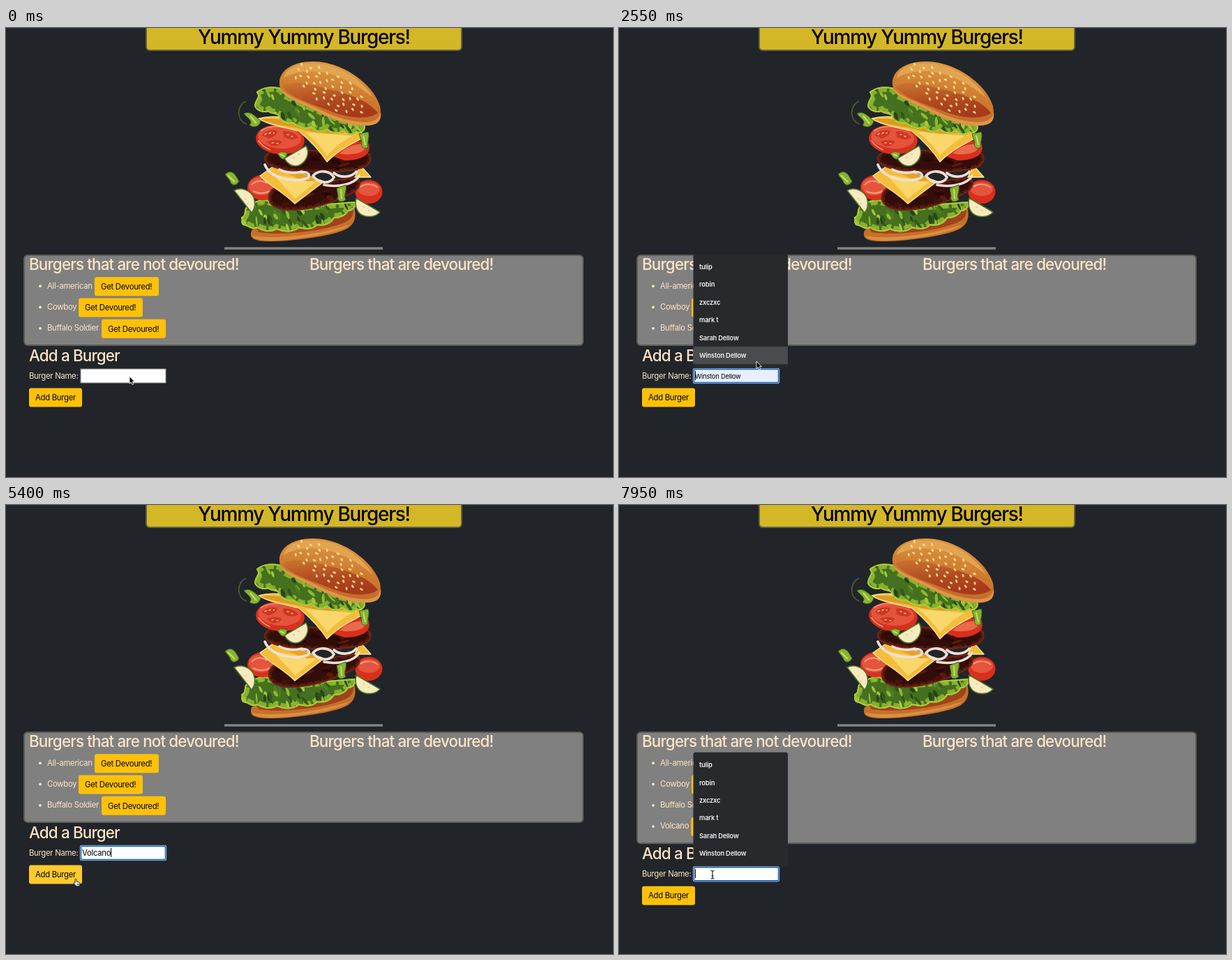
An HTML page for the animation above (8 s loop, 870x644 px).

```html
<!DOCTYPE html>
<html lang="en">
<head>
<meta charset="utf-8">
<title>Yummy Yummy Burgers!</title>
<style>
  html, body { margin: 0; width: 100%; height: 100%; overflow: hidden; background: #212529; }
  svg { display: block; width: 870px; height: 644px; }
  text { font: 11.3px Inter, "Open Sans", sans-serif; font-optical-sizing: none; letter-spacing: -.024em; fill: #000; }
  .title { font-size: 28px; font-weight: 500; letter-spacing: -.047em; }
  .head { font-size: 22.4px; font-weight: 500; letter-spacing: -.038em; fill: bisque; }
  .body { fill: bisque; }
  .menu { font-size: 9.3px; font-weight: 600; letter-spacing: -.02em; fill: #f1f1f1; }
  .ghost { font-size: 9.4px; }
  .btn { fill: #ffc107; }
  .btn.hover { fill: #ffca2c; }
  .btn.focus { fill: #ffca2c; stroke: #d9a406; stroke-opacity: .55; stroke-width: 5.6px; paint-order: stroke; }
  .leaf { fill: #44701f; stroke: #a9cb3b; stroke-width: 2; stroke-linejoin: round; }
  .leafs .rim { fill: none; stroke: #86b02d; stroke-width: 13; stroke-dasharray: 13 4; }
  .bit { fill: #87b32f; stroke: #3f661d; stroke-width: 1; }
  .slice { fill: #f6eabf; stroke: #4d7427; stroke-width: 1.6; stroke-linejoin: round; }
  .onion { fill: none; stroke: #f0dfd7; stroke-width: 3.6; stroke-linecap: round; }
  .patty { fill: #330d09; stroke: #6e2716; stroke-width: 2; }
  .meat .rim { fill: none; stroke: #541a10; stroke-width: 8; stroke-dasharray: 9 2; }
  .cheese { fill: #f4bd3a; stroke: #fbe9a2; stroke-width: 1.3; stroke-linejoin: round; }
  .tomato { fill: #da2f1d; }
</style>
</head>
<body>
<svg viewBox="0 0 870 644">
  <defs>
    <clipPath id="leafTop"><path d="M357 112C357 102 366 100 360 92C370 84 384 84 394 87L400 95C425 108 450 118 480 130L513 138C516 146 510 152 502 149C496 155 488 152 483 147C474 153 466 150 460 145C452 151 444 148 438 142C428 146 418 142 412 136C402 138 394 133 392 127C388 120 380 124 376 119C368 122 360 118 357 112Z"/></clipPath>
    <clipPath id="leafLow"><path d="M338 272C346 268 340 262 346 256C352 250 360 250 366 246L420 256L500 250C502 256 496 262 490 262C486 270 478 272 470 272C466 280 456 284 446 282C438 290 428 288 420 286C410 294 398 292 388 288C378 294 366 290 360 286C350 290 348 282 340 282C336 278 340 276 338 272Z"/></clipPath>
    <clipPath id="pattyTop"><path d="M371 186C374 174 400 172 440 176L515 178C526 182 524 194 514 199C490 208 440 208 405 204C385 201 370 196 371 186Z"/></clipPath>
    <clipPath id="pattyLow"><path d="M377 240C380 226 400 222 440 224L500 214C510 218 508 228 500 234C480 246 440 262 405 261C385 260 375 252 377 240Z"/></clipPath>
    <linearGradient id="bunTop" x1=".6" y1="0" x2=".35" y2="1">
      <stop offset="0" stop-color="#e09a45"/><stop offset=".45" stop-color="#cf7d30"/><stop offset="1" stop-color="#c06426"/>
    </linearGradient>
    <linearGradient id="bunShade" x1="0" y1="0" x2=".3" y2="1">
      <stop offset="0" stop-color="#cb7430"/><stop offset=".6" stop-color="#b14a1f"/><stop offset="1" stop-color="#a83a1b"/>
    </linearGradient>
  </defs>

  <rect x="201" y="-20" width="452" height="52" rx="5" fill="#d4b727" stroke="#66623f" stroke-width="2"/>
  <text class="title" x="275" y="23">Yummy Yummy Burgers!</text>

  <g id="burger">
    <!-- bottom bun -->
    <path fill="#c77029" d="M351 294C352 286 365 280 385 282C430 280 470 268 498 254C504 270 500 284 484 290C460 300 400 307 372 306C356 305 350 302 351 294Z"/>
    <path fill="#9f431c" d="M358 286C400 292 460 280 497 258C500 268 495 276 480 281C450 292 395 298 362 293Z"/>
    <path fill="#d98f44" d="M353 298C390 304 450 296 492 282C486 291 440 300 400 304C375 306 356 305 353 298Z"/>
    <g class="leafs" data-clip="leafLow"></g>
    <!-- lower tomatoes -->
    <ellipse class="tomato" cx="368" cy="229" rx="22" ry="18"/>
    <ellipse cx="366" cy="227" rx="18" ry="13" fill="#e5543c"/>
    <path d="M352 225C358 218 368 218 374 223M354 234C362 238 370 238 378 234" fill="none" stroke="#f3a07f" stroke-width="2"/>
    <ellipse class="tomato" cx="520" cy="235" rx="19.5" ry="17"/>
    <ellipse cx="520" cy="231" rx="16" ry="10" fill="#e5543c"/>
    <path d="M508 228C515 223 526 223 533 229" fill="none" stroke="#f3a07f" stroke-width="2"/>
    <g class="meat" data-clip="pattyLow"></g>
    <!-- lower cheese -->
    <path class="cheese" d="M500 214L508 197L523 214Z"/>
    <path class="cheese" d="M364 212L388 195L456 220L414 252C398 236 380 228 364 212Z"/>
    <path fill="#f9d76c" d="M384 210L444 221L414 245C404 232 394 224 384 210Z"/>
    <path fill="#e5a325" d="M388 197L452 218L432 220C416 215 400 209 388 197Z"/>
    <g class="meat" data-clip="pattyTop"></g>
    <path class="onion" d="M371 196C378 214 410 224 433 215C438 208 428 206 424 207M392 203C402 208 412 209 424 206M440 212C448 203 464 204 470 214C466 224 448 224 440 212M456 225C476 229 500 224 506 212M470 208C480 216 496 214 502 206"/>
    <!-- upper tomatoes -->
    <path class="tomato" d="M468 184C476 168 502 158 519 164C526 180 512 190 485 190Z"/>
    <path fill="#e96b4c" d="M478 180C488 170 504 164 516 168C516 178 500 184 478 180Z"/>
    <g transform="rotate(5 393 160)">
      <ellipse class="tomato" cx="393" cy="160" rx="35" ry="21"/>
      <ellipse cx="392" cy="157" rx="31" ry="16" fill="#e4533b"/>
      <path fill="#cf3524" d="M366 156Q374 145 388 148Q388 156 376 160ZM396 148Q412 146 419 155Q410 161 398 156ZM374 165Q386 159 396 163Q392 171 382 170Z"/>
      <path d="M364 150Q376 140 396 142M362 164Q368 172 380 176" fill="none" stroke="#f0927a" stroke-width="1.6"/>
      <path d="M370 155l3-2M376 153l3-2M382 152l2-1M402 152l3 0M408 154l3 0M381 166l3-1M388 166l3 0" stroke="#f6c56b" stroke-width="1.6"/>
    </g>
    <!-- upper cheese -->
    <path class="cheese" d="M362 130C380 125 400 127 415 134L500 145L517 155C495 166 475 176 460 192C450 176 434 160 420 148C400 142 378 140 362 130Z"/>
    <path fill="#f9d76c" d="M428 149L496 155C482 162 470 172 460 183C452 170 440 158 428 149Z"/>
    <path fill="#dc9c22" d="M366 131C385 128 405 132 420 140L490 150C465 154 440 150 415 143C398 140 380 138 366 131Z"/>
    <g class="leafs" data-clip="leafTop"></g>
    <!-- top bun -->
    <path fill="url(#bunTop)" d="M392 82C390 62 410 48 440 48C482 48 526 80 536 112C539 128 535 139 516 140C490 141 458 127 440 117C418 106 396 98 392 82Z"/>
    <path fill="#e3a44f" d="M398 72C402 54 424 50 446 51C480 53 512 76 526 100C500 78 470 63 440 62C420 62 404 67 398 72Z"/>
    <path fill="url(#bunShade)" d="M396 84C412 74 440 82 465 88C490 94 520 104 533 122C520 132 490 130 462 118C436 108 408 100 396 84Z"/>
    <path fill="#dc9646" d="M392 84C400 97 425 105 442 113C470 128 495 135 516 135C530 134 535 130 537 120C539 134 532 140 516 140C490 141 458 127 440 117C418 106 394 98 392 84Z"/>
    <g id="seeds" fill="#f4dc98"></g>
    <!-- loose pieces -->
    <path d="M344 105C331 110 329 132 345 138" fill="none" stroke="#4c5b35" stroke-width="1.8"/>
    <path class="bit" d="M341 123C350 118 356 126 365 133C364 142 354 144 349 139C355 134 347 130 341 123Z"/>
    <path class="bit" d="M314 210C320 204 326 206 330 213L334 220C330 227 323 227 321 219Z"/>
    <path class="bit" d="M389 180C394 176 398 178 403 179L401 187C396 190 393 186 389 180Z"/>
    <path class="bit" d="M506 152L519 149C522 156 517 164 519 171C512 175 508 170 510 164Z"/>
    <path class="bit" d="M474 230L487 225C489 234 483 240 487 246C480 252 474 248 476 241Z"/>
    <path d="M318 211L328 221M512 154L515 168M480 231L481 245M393 181L399 184M350 126L359 137" stroke="#c9dc69" stroke-width="2"/>
    <path class="slice" d="M399 187L430 169C436 179 431 192 420 197C412 200 404 196 399 187Z"/>
    <path class="slice" d="M327 233C336 228 350 232 355 243C358 252 356 260 352 265Z"/>
    <path class="slice" d="M502 244L536 264C530 272 514 273 506 265C501 259 500 252 502 244Z"/>
    <path d="M411 186l3 0M418 181l3 0M342 244l2 2M346 251l1 2M512 256l2 1M519 261l2 1" stroke="#dcc887" stroke-width="1.4"/>
  </g>

  <rect x="313" y="314.3" width="227" height="3.4" fill="#858585"/>
  <rect id="panel" x="26" y="326" width="801" height="129" rx="5" fill="#808080" stroke="#5d5b56" stroke-width="2"/>
  <text class="head" x="33" y="346.7">Burgers that are not devoured!</text>
  <text class="head" x="435" y="346.7">Burgers that are devoured!</text>
  <g id="rows"></g>

  <g id="form">
    <text class="head" x="33" y="477.6">Add a Burger</text>
    <text class="body" x="33" y="503">Burger Name:</text>
    <rect id="box" x="107" y="489" width="122" height="20" fill="#fff" stroke="#8a8c8e"/>
    <g id="ring" fill="none">
      <rect x="106.4" y="488.4" width="123.2" height="21.2" rx="2" stroke="#fff" stroke-width=".9"/>
      <rect x="107.4" y="489.4" width="121.2" height="19.2" rx="1" stroke="#1667c5" stroke-width="1.7"/>
    </g>
    <text id="typed" x="109" y="503"></text>
    <text id="ghost" class="ghost" x="109" y="502.6">Winston Dellow</text>
    <rect id="caret" y="492" width="1" height="13"/>
    <rect id="add" class="btn" x="33" y="516.5" width="76" height="27" rx="3"/>
    <text x="42" y="534">Add Burger</text>
    <g id="popup">
      <rect x="106.5" y="324.5" width="135.5" height="163.5" rx="3" fill="#28292c"/>
      <rect id="pick" x="106.5" y="457" width="135.5" height="25.2" fill="#4a4b4e"/>
    </g>
  </g>

  <g id="cursor">
    <path id="arrow" d="M0 0V10.6L2.4 8.5 4.1 12 5.9 11.2 4.3 7.7H7.4Z" stroke="#fff" stroke-width=".9"/>
    <path id="beam" d="M-2.5-5.5Q0-5.5 0-4Q0-5.5 2.5-5.5M0-4V5M-1.5 2H1.5M-2.5 6Q0 6 0 4.5Q0 6 2.5 6" fill="none" stroke="#111" stroke-width="1.1"/>
    <path id="hand" d="M2.6 6.2V1.4a1 1 0 0 1 2 0V4.2L8 5Q9.6 5.4 9.4 7L8.8 10.8H4.2L.8 6.8C.3 5.8 1.4 5.2 2.6 6.2ZM5.8 7V9M7.3 7V9" fill="#fff" stroke="#111" stroke-width=".9"/>
  </g>
</svg>

<script>
const LOOP = 8000, ROW = 30.3;
const $ = id => document.getElementById(id);

function make(parent, tag, attrs, text) {
  const el = document.createElementNS(parent.namespaceURI, tag);
  for (const key in attrs) el.setAttribute(key, attrs[key]);
  if (text) el.textContent = text;
  return parent.appendChild(el);
}

let seed = 7;
const rand = (lo, hi) => {
  seed = seed * 16807 % 2147483647;
  return lo + (hi - lo) * seed / 2147483647;
};

// Fills a clipped outline with a broken rim and tilted dabs of colour.
function texture(group, cls, count, size, tilt, colors) {
  const id = group.dataset.clip, d = $(id).firstElementChild.getAttribute('d');
  make(group, 'path', { d, class: cls });
  const b = group.getBBox();
  const inner = make(group, 'g', { 'clip-path': `url(#${id})` });
  make(inner, 'path', { d, class: 'rim' });
  for (let i = 0; i < count; i++) {
    const x = rand(b.x, b.x + b.width), y = rand(b.y, b.y + b.height);
    make(inner, 'ellipse', {
      cx: x, cy: y, rx: rand(.5, 1) * size, ry: rand(.15, .35) * size,
      fill: colors[i % colors.length], transform: `rotate(${tilt + rand(-25, 25)} ${x} ${y})`
    });
  }
  make(group, 'path', { d, class: cls, style: 'fill:none' });
}

document.querySelectorAll('.leafs').forEach(g =>
  texture(g, 'leaf', 60, 8, 65, ['#34551b', '#a5c73b', '#4f7f22', '#8fb931', '#29441a']));
document.querySelectorAll('.meat').forEach(g =>
  texture(g, 'patty', 18, 9, -6, ['#451209', '#260705', '#5a1b0f']));

// Sesame seeds on a golden-angle spiral, flattened and tilted with the bun.
for (let i = 1; i <= 46; i++) {
  const a = i * 2.4, r = Math.sqrt(i / 46);
  const u = 60 * r * Math.cos(a), v = 24 * r * Math.sin(a);
  const x = 465 + .86 * u - .5 * v, y = 88 + .5 * u + .86 * v;
  make($('seeds'), 'ellipse', { cx: x, cy: y, rx: 2.4, ry: 1.4, transform: `rotate(${20 + i * 47 % 70} ${x} ${y})` });
}

const rows = [['All-american', 127], ['Cowboy', 104], ['Buffalo Soldier', 137], ['Volcano', 103.3]].map(([name, x], i) => {
  const g = make($('rows'), 'g', { transform: `translate(0 ${i * ROW})` });
  make(g, 'circle', { cx: 49, cy: 370.2, r: 1.9, class: 'body' });
  make(g, 'text', { x: 59, y: 373.6, class: 'body' }, name);
  make(g, 'rect', { x, y: 357.2, width: 92, height: 27, rx: 3, class: 'btn' });
  make(g, 'text', { x: x + 9, y: 375 }, 'Get Devoured!');
  return g;
});

['tulip', 'robin', 'zxczxc', 'mark t', 'Sarah Dellow', 'Winston Dellow'].forEach((name, i) =>
  make($('popup'), 'text', { x: 115, y: 346 + i * 25.4, class: 'menu' }, name));

// Each step changes only the listed parts of the state.
const steps = [
  [0, { cursor: ['arrow', 177, 499.5], text: '', focus: 0, caret: 0, popup: 0, pick: 0, button: '', added: 0 }],
  [1500, { cursor: ['beam', 177, 500], focus: 1, caret: 1 }],
  [1650, { popup: 1 }],
  [1800, { cursor: ['beam', 183, 496] }],
  [1950, { cursor: ['arrow', 193, 481], pick: 1 }],
  [2100, { cursor: ['arrow', 197, 478], caret: 0 }],
  [2550, { caret: 1 }],
  [2850, { text: 'V', pick: 0, popup: .5 }],
  [3000, { popup: 0 }],
  [3150, { text: 'Vo' }],
  [3450, { text: 'Vol' }],
  [3600, { text: 'Volca' }],
  [3750, { text: 'Volcan' }],
  [4050, { text: 'Volcano' }],
  [4500, { caret: 0 }],
  [4800, { cursor: ['arrow', 187, 497] }],
  [4950, { cursor: ['arrow', 158, 530] }],
  [5100, { cursor: ['arrow', 130, 548], caret: 1 }],
  [5250, { cursor: ['arrow', 111, 544] }],
  [5400, { cursor: ['hand', 96.5, 536], button: 'hover' }],
  [5550, { cursor: ['hand', 93.5, 535], caret: 0 }],
  [6000, { caret: 1 }],
  [6600, { caret: 0 }],
  [6900, { button: 'focus', focus: 0 }],
  [7050, { text: '' }],
  [7200, { cursor: ['arrow', 96, 535], button: '', added: 1 }],
  [7500, { cursor: ['arrow', 100, 534] }],
  [7650, { cursor: ['beam', 118, 532] }],
  [7800, { cursor: ['beam', 134, 530] }],
  [7950, { focus: 1, caret: 1, popup: 1 }]
];

const show = (el, on) => { el.style.display = on ? '' : 'none'; };

function draw(t) {
  const s = {};
  for (const [time, change] of steps) if (t >= time) Object.assign(s, change);

  const shift = s.added * ROW;
  $('panel').setAttribute('height', 129 + shift);
  $('form').setAttribute('transform', `translate(0 ${shift})`);
  show(rows[3], s.added);

  $('typed').textContent = s.text;
  show($('ghost'), s.pick);
  $('box').setAttribute('fill', s.pick ? '#e8f0fe' : '#fff');
  show($('ring'), s.focus);
  show($('caret'), s.caret);
  $('caret').setAttribute('x', 109 + (s.text ? $('typed').getComputedTextLength() : 0));
  $('popup').style.opacity = s.popup;
  show($('pick'), s.pick);
  $('add').setAttribute('class', 'btn ' + s.button);

  const [kind, x, y] = s.cursor;
  $('cursor').setAttribute('transform', `translate(${x} ${y})`);
  for (const id of ['arrow', 'beam', 'hand']) show($(id), id === kind);
}

const start = performance.now();
function tick() {
  draw((performance.now() - start) % LOOP);
  requestAnimationFrame(tick);
}
tick();
</script>
</body>
</html>
```
